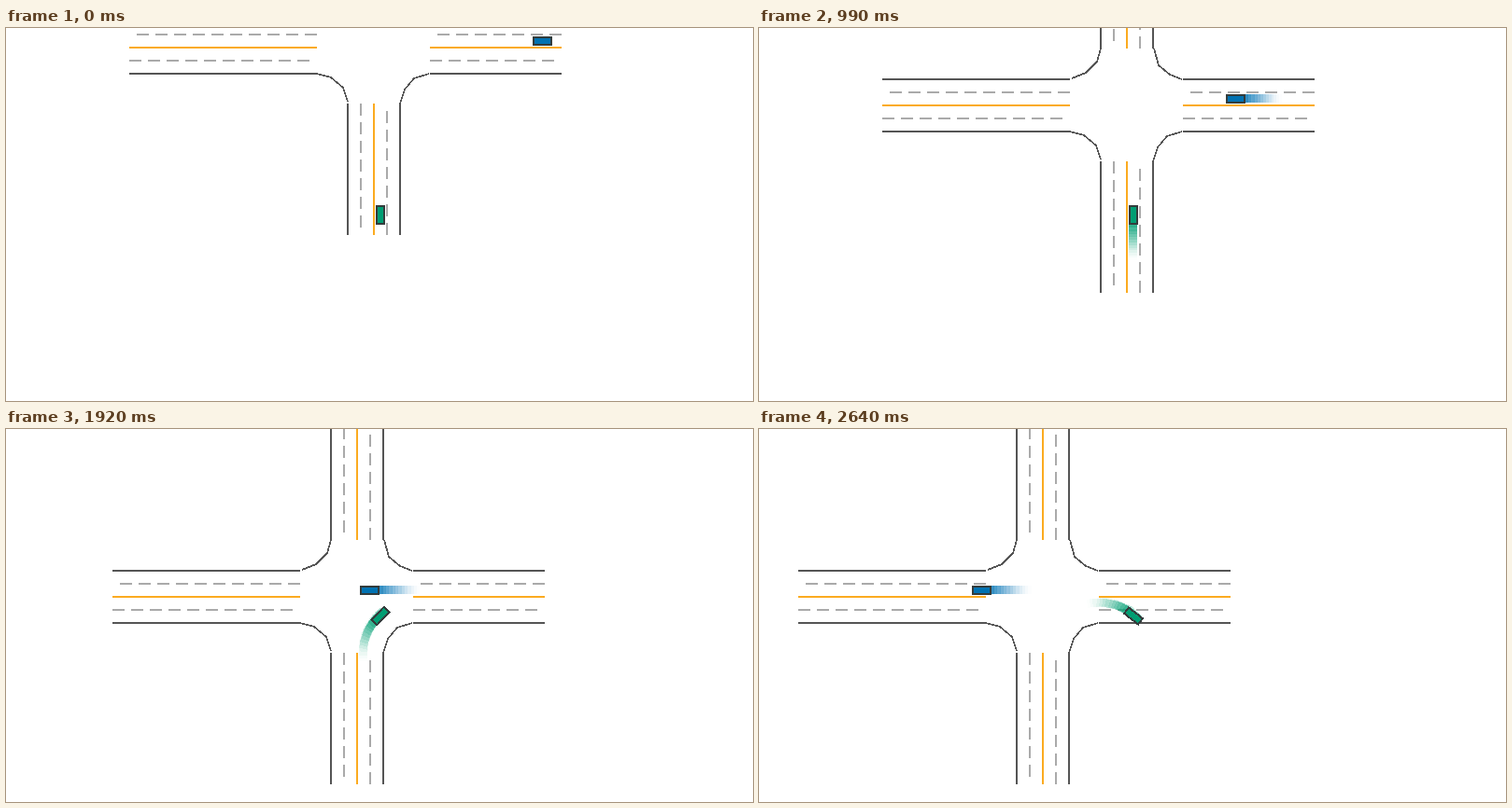
These frames come from a looping animation (800x400 px, 2.67 s). An HTML page:

```html
<!DOCTYPE html>
<html lang="en">
<head>
<meta charset="utf-8">
<title>Intersection</title>
<style>
  html, body { margin: 0; width: 100%; height: 100%; overflow: hidden; background: #fff; }
  svg { display: block; width: 800px; height: 400px; }
</style>
</head>
<body>
<svg id="stage" viewBox="0 0 800 400" shape-rendering="crispEdges">
  <g id="road" fill="none" stroke-width="2"></g>
  <g id="cars"></g>
</svg>
<script>
const LOOP = 2670, HOLD = 120, STEP = 30;
const SPEED = 3.32;             // px per step
const TURN_AT = 48.6;           // step at which the steering starts
const RATE = 3.51 * Math.PI / 180;
const SLIP = 4.38 * Math.PI / 180;
const TRAIL = 13;

const road = document.getElementById('road');
const carLayer = document.getElementById('cars');

function add(parent, tag, attrs) {
  const el = document.createElementNS('http://www.w3.org/2000/svg', tag);
  for (const name in attrs) el.setAttribute(name, attrs[name]);
  parent.appendChild(el);
  return el;
}

const path = (d, stroke, extra) => add(road, 'path', { d, stroke, ...extra });

// One arm of the crossing; `mid` is its centre line, running from `a` to `b`.
function arm(vertical, mid, a, b, shiftFirst) {
  const line = (off, from, to) => vertical
    ? `M${mid + off} ${from}V${to}`
    : `M${from} ${mid + off}H${to}`;
  const dashed = (off, shifted) => {
    let d = '';
    for (let s = a + (shifted ? 8 : 0); s + 13 <= b; s += 20) d += line(off, s, s + 13);
    path(d, '#aaa');
  };
  dashed(-14, shiftFirst);
  dashed(14, !shiftFirst);
  path(line(0, a, b), '#fbab20');
  path(line(-28, a, b) + line(28, a, b), '#555');
}

arm(false, 21, 132, 333, true);
arm(false, 21, 454, 595, true);
arm(true, 394, 81, 222, false);
arm(true, 394, -181, -40, false);

path('M333 49L348 53L361 64L366 79' +
     'M422 81L427 66L437 54L453 49' +
     'M366 -40L362 -26L350 -14L335 -8' +
     'M423 -40L428 -22L440 -12L453 -7', '#555', { 'stroke-width': 1.7 });

// Distance driven after k steps, starting from rest.
function driven(k, lag) {
  const rest = Math.max(0, 1 - k / (4 * lag));
  return SPEED * (k - lag * (1 - rest ** 4));
}

function bluePose(k) {
  return { x: 574.5 - Math.round(driven(k, 10.8)), y: 14, angle: 180 };
}

function greenPose(k) {
  let x = 0, y = driven(Math.min(k, TURN_AT), 11.6), turn = 0;
  if (k > TURN_AT) {
    turn = RATE * (k - TURN_AT);
    const r = SPEED / RATE;
    x = r * (Math.cos(SLIP) - Math.cos(turn + SLIP));
    y += r * (Math.sin(turn + SLIP) - Math.sin(SLIP));
  }
  return {
    x: 401 + Math.round(x),
    y: 200.5 - Math.round(y),
    angle: turn * 180 / Math.PI - 90
  };
}

function makeCar(pose, fill, side) {
  const ghosts = [];
  for (let j = TRAIL; j > 0; j--) {
    const el = add(carLayer, 'rect', {
      x: -10.5, y: side, width: 21, height: 9, fill,
      opacity: 1 - (j / (TRAIL + 1)) ** (1 / 6)
    });
    ghosts.push({ el, j });
  }
  const body = add(carLayer, 'rect', {
    x: -9.5, y: -4, width: 19, height: 8, fill, stroke: '#333c3c', 'stroke-width': 2
  });
  return { pose, ghosts, body };
}

const cars = [makeCar(greenPose, '#009e73', -5), makeCar(bluePose, '#0072b2', -4)];

function place(el, p) {
  el.setAttribute('transform', `translate(${p.x} ${p.y}) rotate(${p.angle})`);
}

function draw(time) {
  const t = time % LOOP;
  const k = t < HOLD ? 0 : Math.floor((t - HOLD) / STEP) + 1;
  const ego = greenPose(k);
  const camera = `translate(${401 - ego.x} ${200.5 - ego.y})`;
  road.setAttribute('transform', camera);
  carLayer.setAttribute('transform', camera);
  for (const { pose, ghosts, body } of cars) {
    place(body, pose(k));
    for (const { el, j } of ghosts) {
      el.setAttribute('visibility', j <= k ? 'visible' : 'hidden');
      if (j <= k) place(el, pose(k - j));
    }
  }
}

const start = performance.now();
function tick() {
  draw(performance.now() - start);
  requestAnimationFrame(tick);
}
draw(0);
requestAnimationFrame(tick);
</script>
</body>
</html>
```
